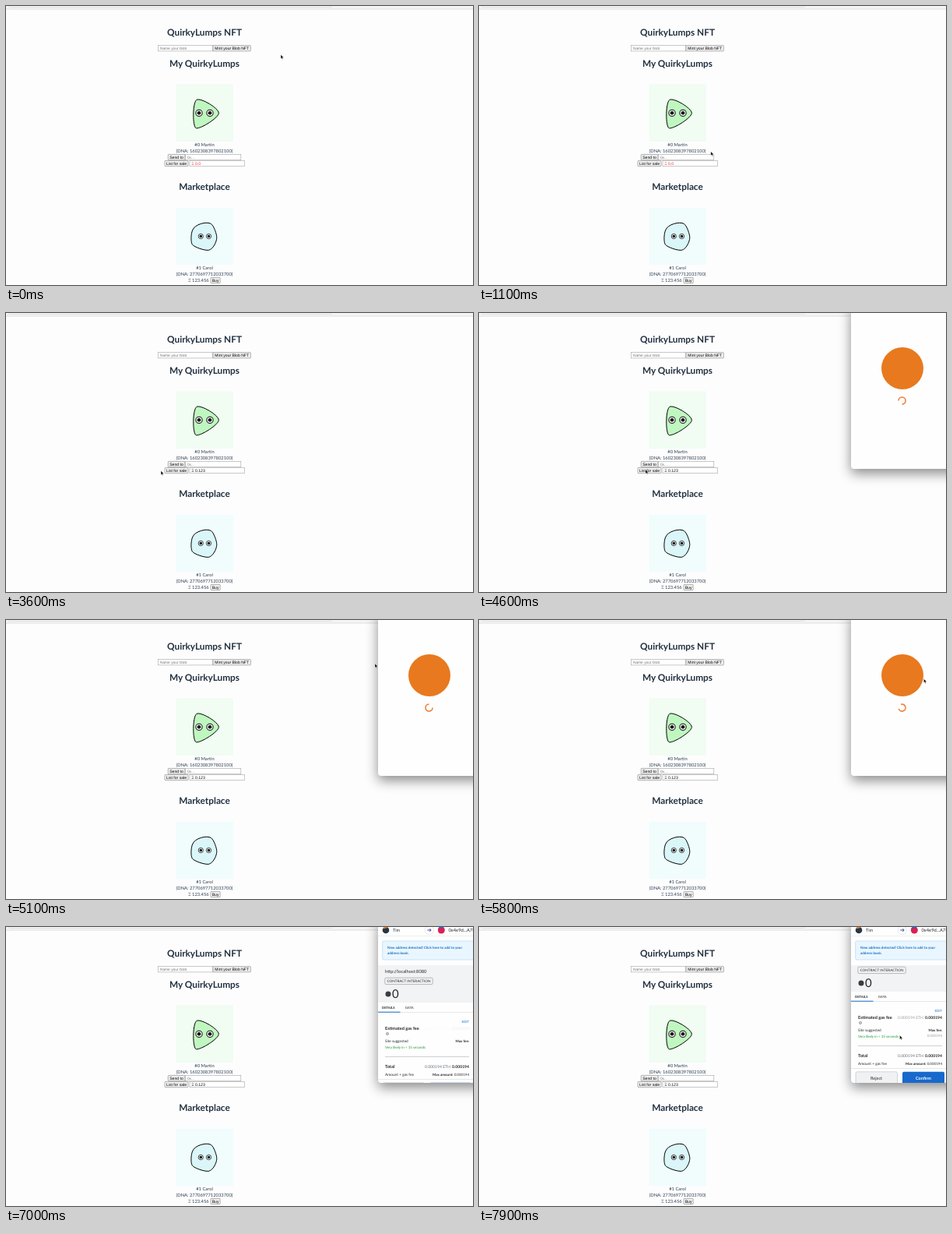
These frames come from a looping animation (600x358 px, 8 s). An HTML page:

```html
<!DOCTYPE html>
<html lang="en">
<head>
<meta charset="utf-8">
<title>NFT marketplace</title>
<style>
  html, body { margin: 0; width: 100%; height: 100%; overflow: hidden; background: #fdfdfe; }
  svg { display: block; width: 100vw; height: 100vh; text-rendering: geometricPrecision; }
  text { font: 5.8px Lato, "Open Sans", sans-serif; fill: #2c3e50; white-space: pre; }
  .mid { text-anchor: middle; }
  .end { text-anchor: end; }
  .heading { font-size: 11.8px; font-weight: 700; fill: #22313f; }
  .control { font: 4.85px "Liberation Sans", Arial, sans-serif; fill: #000; }
  .label, #price { font-size: 5.08px; }
  .hint { fill: #757575; }
  .field { fill: #fff; stroke: #a6a6a6; stroke-width: .6; }
  .button { fill: #efefef; stroke: #858585; stroke-width: .6; }
  .outline { stroke: #000; stroke-linejoin: round; }
  #popup text { fill: #24272a; font-size: 5.1px; }
  #popup .bold { font-weight: 700; }
  #popup .row { font-size: 5.6px; font-weight: 700; }
  #popup .small { font-size: 4.5px; }
  #popup .muted { fill: #9a9da1; }
  #popup .blue { fill: #1670c4; }
</style>
</head>
<body>
<svg viewBox="0 0 600 358" preserveAspectRatio="none">
  <defs>
    <clipPath id="popupClip"><rect x="478" y="-10" width="140" height="210" rx="4"/></clipPath>
    <clipPath id="scrollClip"><rect x="478" y="49" width="122" height="151"/></clipPath>
    <g id="eye">
      <circle r="4.1" fill="#fff" stroke="#000"/>
      <circle r="2.3"/>
    </g>
  </defs>

  <rect width="600" height="358" fill="#fdfdfe"/>
  <rect width="600" height="4" fill="#f4f4f4"/>
  <path d="M3 .5Q4 1.5 6 1.5H416Q418 1.5 419 .5" fill="none" stroke="#dcdcdc" stroke-width=".8"/>
  <path d="M0 4H600" stroke="#d8d8d8" stroke-width=".8"/>

  <text class="heading mid" x="255" y="38.3">QuirkyLumps NFT</text>
  <text class="heading mid" x="255" y="78.2">My QuirkyLumps</text>
  <text class="heading mid" x="255" y="236.2">Marketplace</text>

  <g id="form"></g>

  <rect x="218.5" y="100.5" width="73.5" height="73.5" fill="#f1fcf2"/>
  <path class="outline" fill="#c0f7c1" d="M245 120.3C251 117.8 273 131 273.3 137.3C273.5 143 251 157.5 244.3 156.8C239.5 155 239.5 124 245 120.3Z"/>
  <use href="#eye" x="248" y="137.3"/>
  <use href="#eye" x="262" y="137.3"/>
  <text class="mid" x="255" y="179.8">#0 Martin</text>
  <text class="mid" x="255" y="187.5">(DNA: 1602308397802100)</text>

  <rect x="218.5" y="258.7" width="73.5" height="73.3" fill="#f1fcfd"/>
  <path class="outline" fill="#daf6f9" d="M239.5 288C242 280 258 276 263.5 279.5C267 282 271 293 270.8 297.5C270.5 303 266 312 260.5 313.3C255 314 242 309.5 239.3 306C237.3 303 237.5 293 239.5 288Z"/>
  <use href="#eye" transform="translate(250.3 295.5) scale(.76)"/>
  <use href="#eye" transform="translate(260.5 295.5) scale(.76)"/>
  <text class="mid" x="255" y="337.8">#1 Carol</text>
  <text class="mid" x="255" y="345.7">(DNA: 2770697712033700)</text>
  <text x="234" y="354">Ξ 123.456</text>

  <g id="popup">
    <rect x="478" y="-10" width="140" height="210" rx="4" fill="#fefefe" style="filter:drop-shadow(0 6px 8px rgba(0,0,0,.45))"/>
    <g id="loading">
      <circle cx="544" cy="71" r="27" fill="#e8791e"/>
      <path id="spinner" d="M543.5 108A4.5 4.5 0 1 0 548 112.5" fill="none" stroke="#f0762a" stroke-width="1.5"/>
    </g>
    <g id="details" clip-path="url(#popupClip)">
      <circle cx="488" cy="4" r="4.3" fill="#263746"/>
      <path d="M484 2.5A4.3 4.3 0 0 1 491 .8Z" fill="#ef7d26"/>
      <text x="497" y="6" style="font-size:5.5px">Tim</text>
      <circle cx="543.8" cy="4" r="5.6" fill="#fff" stroke="#d6d9dc" stroke-width=".6"/>
      <path d="M541.3 4H546M544.2 2L546.2 4L544.2 6" fill="none" stroke="#34398c" stroke-width=".9"/>
      <circle cx="559.3" cy="4" r="4.5" fill="#e21d50"/>
      <path d="M555.3 2A4.5 4.5 0 0 1 563 1.4Z" fill="#2565c7"/>
      <text x="568.5" y="6" style="font-size:5.8px">0x4e9d...A7F</text>
      <path d="M478 11.5H600" stroke="#e2e4e6" stroke-width=".6"/>
      <rect x="483.7" y="18" width="122" height="24" rx="2" fill="#eaf6ff" stroke="#a5d4f7" stroke-width=".6"/>
      <text class="small bold blue" x="490" y="28.3">New address detected! Click here to add to your</text>
      <text class="small bold blue" x="490" y="35.2">address book.</text>

      <g clip-path="url(#scrollClip)"><g id="scroll">
        <rect x="478" y="49" width="122" height="48" fill="#f2f3f4"/>
        <text x="487" y="59.3" style="font-size:5.8px">http://localhost:8080</text>
        <rect x="486.8" y="65.2" width="61.4" height="8.4" rx="1.5" fill="none" stroke="#8d9196" stroke-width=".6"/>
        <text class="mid" x="517.5" y="71" style="font-size:4.6px">CONTRACT INTERACTION</text>
        <circle cx="491" cy="86" r="3.5" fill="#3c3c3d"/>
        <text x="496" y="91.3" style="font-size:15px">0</text>
        <text class="small bold" x="483" y="104.6" style="font-size:4.2px">DETAILS</text>
        <text class="small" x="513" y="104.6" style="font-size:4.2px">DATA</text>
        <path d="M478 109.5H600" stroke="#d6d9dc" stroke-width=".6"/>
        <path d="M478 109.2H506.5" stroke="#1670c4"/>

        <text class="small blue end" x="595" y="122.7" style="font-size:4.3px">EDIT</text>
        <text class="row" x="487" y="131.8">Estimated gas fee</text>
        <circle cx="490" cy="137" r="1.7" fill="#c4c7cb" stroke="#7d8288" stroke-width=".5"/>
        <g class="gas">
          <text class="muted end" x="571" y="131.8">0.000194 ETH</text>
          <text class="bold end" x="595" y="131.8">0.000194</text>
        </g>
        <text class="small" x="487" y="148.4" font-style="italic" style="font-size:4.7px">Site suggested</text>
        <text class="small bold end" x="595" y="148.4">Max fee:</text>
        <text class="small muted end gas" x="595" y="155">0.000194</text>
        <text id="likely" class="small" x="487" y="156.2" style="fill:#1c9a28">Very likely in &lt; 15 seconds</text>

        <g id="summary">
          <path d="M487 164.5H595" stroke="#b9bdc2" stroke-width=".7"/>
          <text class="row" x="487" y="179">Total</text>
          <text class="end" x="571" y="179" style="fill:#6a7078">0.000194 ETH</text>
          <text class="bold end" x="595" y="179">0.000194</text>
          <text class="small" x="487" y="188.5" style="font-size:4.8px">Amount + gas fee</text>
          <text class="small bold end" x="574.5" y="188.5">Max amount:</text>
          <text class="small end" x="595" y="188.5">0.000194</text>
          <path d="M478 193.5H600" stroke="#d6d9dc" stroke-width=".6"/>
          <rect x="484" y="197.8" width="53.5" height="17" rx="2" fill="#f0f1f2" stroke="#b9bdc2" stroke-width=".6"/>
          <rect x="544" y="197.8" width="54" height="17" rx="2" fill="#1769cc"/>
          <text class="mid" x="510.5" y="208.2" style="font-size:5.6px">Reject</text>
          <text class="mid bold" x="571" y="208.2" style="font-size:5.6px;fill:#fff">Confirm</text>
        </g>
      </g></g>
    </g>
  </g>

  <path id="cursor" d="M0 0V5.2L1.2 4.1L2 6L2.9 5.6L2.1 3.8H3.8Z" fill="#000" stroke="#fff" stroke-width=".4"/>
</svg>
<script>
const LOOP = 8000, STEP = 100;
const $ = id => document.getElementById(id);
const show = (id, visible) => $(id).setAttribute("visibility", visible ? "inherit" : "hidden");

const field = (x, y, w, text, id = "") =>
  `<rect class="field" x="${x}" y="${y}" width="${w}" height="7.3"/>
   <text class="control hint" id="${id}" x="${x + 2.3}" y="${y + 5.4}">${text}</text>`;
const button = (x, y, w, text) =>
  `<rect class="button" x="${x}" y="${y}" width="${w}" height="7.3" rx=".8"/>
   <text class="control label mid" x="${x + w / 2}" y="${y + 5.4}">${text}</text>`;

$("form").innerHTML =
  field(195.6, 50.6, 70.2, "Name your blob") + button(266, 50.6, 48.4, "Mint your Blob NFT") +
  button(208.2, 190.4, 21.6, "Send to") + field(230.6, 190.4, 71.2, "0x...") +
  button(204, 198.4, 30, "List for sale") + field(236, 198.4, 70.5, "", "price") +
  `<g id="focus">
     <rect x="236" y="198.3" width="70.8" height="7.6" rx=".6" fill="none" stroke="#5b9df5" stroke-width="1.3"/>
     <path id="caret" d="M0 199.8V204.4" stroke="#333" stroke-width=".5"/>
   </g>` +
  button(263, 348.4, 12.2, "Buy");

// [time, x, y]
const cursorPath = [
  [0, 353, 62.5], [100, 353, 62.5], [200, 401, 32], [400, 407, 32], [800, 340, 120],
  [1200, 290, 199], [1500, 262, 199], [1800, 245, 199], [2900, 330, 191], [3000, 336, 191],
  [3100, 348, 197], [3600, 199, 202.5], [3900, 214, 201], [4900, 214, 201], [5100, 474, 56],
  [5700, 574, 74], [6300, 539.5, 93], [6600, 540, 96], [7300, 541, 136], [7900, 540.5, 139]
];
// [time, opacity]
const gasFade = [[0, 1], [6000, 1], [6300, .75], [6600, 1], [7000, .06], [7400, 1]];
// [time, scroll offset]
const scrollPath = [[0, 0], [7300, 0], [7600, 14]];
// [time, typed amount]
const typing = [
  [0, "0.0"], [1700, "0."], [1900, "0"], [2100, ""], [2300, "0"],
  [2400, "0."], [2500, "0.1"], [2600, "0.12"], [2700, "0.123"]
];

function track(keys, t) {
  const next = keys.findIndex(key => key[0] > t);
  if (next < 0) return keys[keys.length - 1].slice(1);
  const from = keys[next - 1], to = keys[next];
  const p = (t - from[0]) / (to[0] - from[0]);
  const eased = p * p * (3 - 2 * p);
  return from.slice(1).map((value, i) => value + (to[i + 1] - value) * eased);
}

function draw(t) {
  const amount = typing.filter(key => key[0] <= t).pop()[1];
  const price = $("price");
  price.textContent = "Ξ " + amount;
  price.style.fill = Number(amount) > 0 ? "#000" : "#e8262a";
  show("focus", t >= 1200 && t < 2900);
  $("caret").setAttribute("transform", `translate(${238.5 + price.getComputedTextLength()})`);

  const detailed = t >= 5900, likely = t >= 6600;
  show("popup", t >= 4500);
  show("loading", t >= 4500 && !detailed);
  show("details", detailed);
  show("likely", detailed && likely);
  $("spinner").setAttribute("transform", `rotate(${(t - 5100) * .36} 543.5 112.5)`);

  const [opacity] = track(gasFade, t);
  document.querySelectorAll(".gas").forEach(el => el.setAttribute("opacity", opacity));
  $("scroll").setAttribute("transform", `translate(0 ${-track(scrollPath, t)[0]})`);
  $("summary").setAttribute("transform", `translate(0 ${likely ? 2 : 0})`);

  const [x, y] = track(cursorPath, t);
  $("cursor").setAttribute("transform", `translate(${x} ${y})`);
  show("cursor", t < 1900 || (t >= 2900 && t < 6700) || t >= 7300);
}

const start = performance.now();
function tick() {
  const t = (performance.now() - start) % LOOP;
  draw(Math.floor(t / STEP) * STEP);
  requestAnimationFrame(tick);
}
tick();
</script>
</body>
</html>
```
